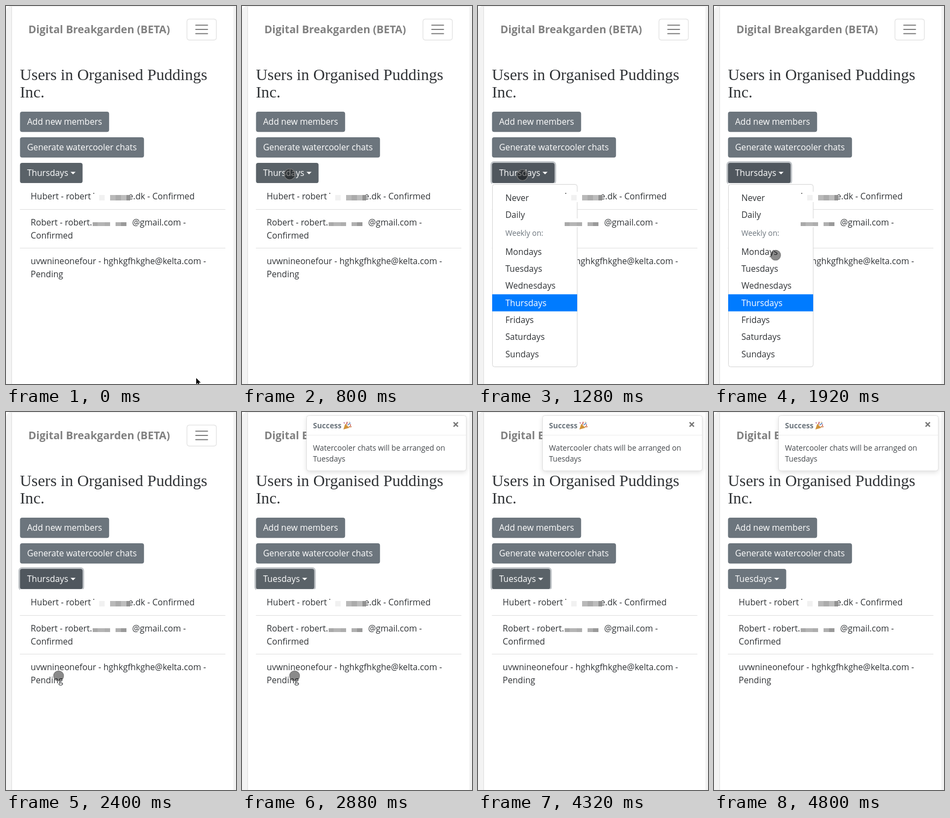
Recreate the animation shown at these times as an HTML page with a canvas. Size 422 px wide and 694 px high, loop 5.12 s.

```html
<!DOCTYPE html>
<html lang="en">
<head>
<meta charset="utf-8">
<title>Schedule picker</title>
<style>
html, body { margin: 0; width: 100%; height: 100%; overflow: hidden; background: #fff; }
canvas { display: block; width: 422px; height: 694px; }
</style>
</head>
<body>
<canvas id="stage"></canvas>
<script>
const W = 422, H = 694, LOOP = 5120;
const SANS = '"Open Sans", "Noto Sans", sans-serif';
const BODY = '15.67px ' + SANS, SMALL = '13.77px ' + SANS;
const INK = '#303336', GREY = '#6c757d';

const canvas = document.getElementById('stage');
const ctx = canvas.getContext('2d');
const dpr = window.devicePixelRatio || 1;
canvas.width = W * dpr;
canvas.height = H * dpr;

// Pointer poses: start time, kind, x, y, radius
const poses = [
  [0, 'arrow', 349, 683],
  [160, 'arrow', 170, 414],
  [320, 'arrow', 144, 372],
  [480, 'touch', 100.5, 311.5, 10],
  [640, 'touch', 94.5, 310, 18],
  [800, 'touch', 87.5, 309, 10],
  [960, 'touch', 81.5, 310.5, 10],
  [1600, 'touch', 86.5, 315, 10],
  [1760, 'touch', 120, 432, 9.2],
  [1920, 'touch', 113, 457.5, 9.2],
  [2080, 'touch', 100.5, 481, 9.2],
  [2240, 'touch', 96.5, 484.5, 9.2],
  [3680, 'touch', 117.5, 461, 9.2],
  [3840, 'touch', 180, 463, 9.2],
  [4160, 'touch', 285, 551, 9.2],
  [4320, 'none']
];

function text(str, x, y, font = BODY, color = INK, align = 'left') {
  ctx.font = font;
  ctx.fillStyle = color;
  ctx.textAlign = align;
  ctx.fillText(str, x, y);
}

function rect(x, y, w, h, color) {
  ctx.fillStyle = color;
  ctx.fillRect(x, y, w, h);
}

function path(points) {
  ctx.beginPath();
  points.forEach(([x, y]) => ctx.lineTo(x, y));
  ctx.closePath();
}

function line(x1, y1, x2, y2, color, width) {
  ctx.beginPath();
  ctx.moveTo(x1, y1);
  ctx.lineTo(x2, y2);
  ctx.strokeStyle = color;
  ctx.lineWidth = width;
  ctx.stroke();
}

function box(x, y, w, h, r, fill, stroke) {
  ctx.beginPath();
  ctx.roundRect(x, y, w, h, r);
  if (fill) { ctx.fillStyle = fill; ctx.fill(); }
  if (stroke) { ctx.strokeStyle = stroke; ctx.lineWidth = 1; ctx.stroke(); }
}

function drawChrome() {
  rect(0, 0, W, H, '#fff');
  box(0, 0, 20, H + 20, [10, 0, 0, 0], '#f3f3f3');
  rect(10, 0, 407, H, '#fff');
  rect(10, 0, 1, H, '#dedede');
  rect(417, 0, 5, H, '#f2f2f2');
  rect(6, 0, 411, 1, '#ececec');
}

function drawHeader() {
  const bold = 'bold 19.58px ' + SANS;
  text('Digital Breakgarden', 41, 50, bold, '#808080');
  text('(BETA)', 301, 50, bold, '#808080', 'right');
  box(332, 24, 54, 38.5, 4, null, '#d9d9d9');
  ctx.lineCap = 'round';
  for (const y of [35.2, 43, 50.8]) line(348.2, y, 369.8, y, '#808080', 1.96);
  ctx.lineCap = 'butt';
  const serif = '29.6px "Liberation Serif", "Noto Serif", serif';
  text('Users in Organised Puddings', 25.5, 136, serif);
  text('Inc.', 25.5, 168, serif);
}

function drawButton(y, w, label, fill = GREY) {
  box(25.7, y, w, 37.2, 4, fill);
  text(label, 38.7, y + 24.3, BODY, '#fff');
}

function drawPicker(t) {
  const done = t >= 2720, focus = t >= 1120 && t < 4800;
  const w = done ? 106.8 : 114.8;
  let fill = '#5a6268';
  if (t >= 4800) fill = GREY;
  else if (focus && !done) fill = '#50575e';
  if (focus) box(22.8, 285.1, w + 5.8, 43, 6.5, '#c0c4c8');
  drawButton(288, w, done ? 'Tuesdays' : 'Thursdays', fill);
  const cx = 25.7 + w - 22.2;
  path([[cx, 304.4], [cx + 9.4, 304.4], [cx + 4.7, 309.1]]);
  ctx.fillStyle = '#fff';
  ctx.fill();
}

function drawList() {
  rect(25.7, 325.2, 376.8, 180, '#fff');
  text('Hubert - robert', 45.3, 355);
  text('e.dk - Confirmed', 346, 355, BODY, INK, 'right');
  text('Robert - robert.', 45.3, 403);
  text('@gmail.com -', 231.5, 403);
  text('Confirmed', 45.3, 426.5);
  text('uvwnineonefour - hghkgfhkghe@kelta.com -', 45.3, 474.3);
  text('Pending', 45.3, 498);
  rect(25.5, 373, 377, 1, '#dedede');
  rect(25.5, 444, 377, 1, '#dedede');
}

function drawMenu() {
  box(26.5, 327.5, 155.5, 335, 4, '#fff', '#d4d4d4');
  const days = ['Mondays', 'Tuesdays', 'Wednesdays', 'Thursdays', 'Fridays', 'Saturdays', 'Sundays'];
  text('Never', 50.2, 357.5);
  text('Daily', 50.2, 388.8);
  text('Weekly on:', 50.2, 422.3, SMALL, GREY);
  rect(26, 529.3, 156, 31.3, '#007bff');
  days.forEach((day, i) => {
    text(day, 50.2, 456.7 + i * 31.35, BODY, i === 3 ? '#fff' : INK);
  });
}

// Pixelated parts of the addresses, which stay above the menu
function drawMasks() {
  rect(163, 341, 62.5, 19, '#fff');
  rect(158.5, 390, 71, 16, '#fff');
  rect(160, 343, 2, 2, '#777');
  [[171, '#f1f1f1'], [191, '#b9b9b9'], [201, '#ababab'], [211, '#bdbdbd']]
    .forEach(([x, c]) => rect(x, 347, 10, 10, c));
  rect(221, 347, 7, 10, '#929292');
  [[159, '#a9a9a9'], [168, '#b5b5b5'], [181, '#aeaeae'], [201, '#b0b0b0'], [211, '#9a9a9a']]
    .forEach(([x, c]) => rect(x, 397, 10, 7, c));
  rect(178, 397, 3, 7, '#b5b5b5');
}

function drawPopper() {
  path([[186, 32], [189.5, 21.5], [197, 29]]);
  ctx.fillStyle = '#d0933a';
  ctx.fill();
  line(192, 23, 193, 18, '#c24a48', 1.6);
  line(194, 24, 199, 20, '#4577b5', 1.6);
  line(196, 27, 201, 27, '#c4662f', 1.6);
  line(188, 21, 187, 19, '#a04a85', 1.6);
  rect(198, 23, 2, 2, '#c24a48');
  rect(196, 18, 1.5, 1.5, '#d0933a');
}

function drawToast(alpha) {
  ctx.save();
  ctx.globalAlpha = alpha;
  ctx.save();
  ctx.shadowColor = 'rgba(0,0,0,.13)';
  ctx.shadowBlur = 10 * dpr;
  ctx.shadowOffsetY = 3 * dpr;
  box(118.5, 6.5, 293, 101.5, 4, '#fff');
  ctx.restore();
  box(118.5, 6.5, 293, 101.5, 4, null, '#e0e0e0');
  rect(119, 42, 292, 1, '#ededed');
  text('Success', 130.3, 30, 'bold 13.7px ' + SANS, GREY);
  drawPopper();
  line(388.2, 18.8, 396.2, 26.8, '#777', 2.4);
  line(396.2, 18.8, 388.2, 26.8, '#777', 2.4);
  text('Watercooler chats will be arranged on', 130.3, 70.5, SMALL, '#45494d');
  text('Tuesdays', 130.3, 91, SMALL, '#45494d');
  ctx.restore();
}

function drawPointer(t) {
  const [, kind, x, y, r] = poses.filter(p => p[0] <= t).pop();
  if (kind === 'arrow') {
    path([[0, 0], [0, 11.6], [2.7, 9.1], [4.7, 13.6], [6.5, 12.8], [4.7, 8.6], [8.3, 8.4]]
      .map(([px, py]) => [x + px, y + py]));
    ctx.lineJoin = 'round';
    ctx.strokeStyle = '#fff';
    ctx.lineWidth = 1.6;
    ctx.stroke();
    ctx.fillStyle = '#000';
    ctx.fill();
  } else if (kind === 'touch') {
    ctx.beginPath();
    ctx.arc(x, y, r, 0, Math.PI * 2);
    ctx.fillStyle = 'rgba(0,0,0,.46)';
    ctx.fill();
    ctx.strokeStyle = '#7c7c7c';
    ctx.lineWidth = 1.2;
    ctx.stroke();
  }
}

function draw(t) {
  ctx.setTransform(dpr, 0, 0, dpr, 0, 0);
  drawChrome();
  drawHeader();
  drawButton(194, 163.5, 'Add new members');
  drawButton(241, 227.5, 'Generate watercooler chats');
  drawPicker(t);
  drawList();
  if (t >= 1280 && t < 2400) drawMenu();
  drawMasks();
  if (t >= 2720) drawToast(t < 2880 ? 0.6 : 1);
  drawPointer(t);
}

const start = performance.now();
function tick() {
  draw((performance.now() - start) % LOOP);
  requestAnimationFrame(tick);
}
tick();
</script>
</body>
</html>
```
